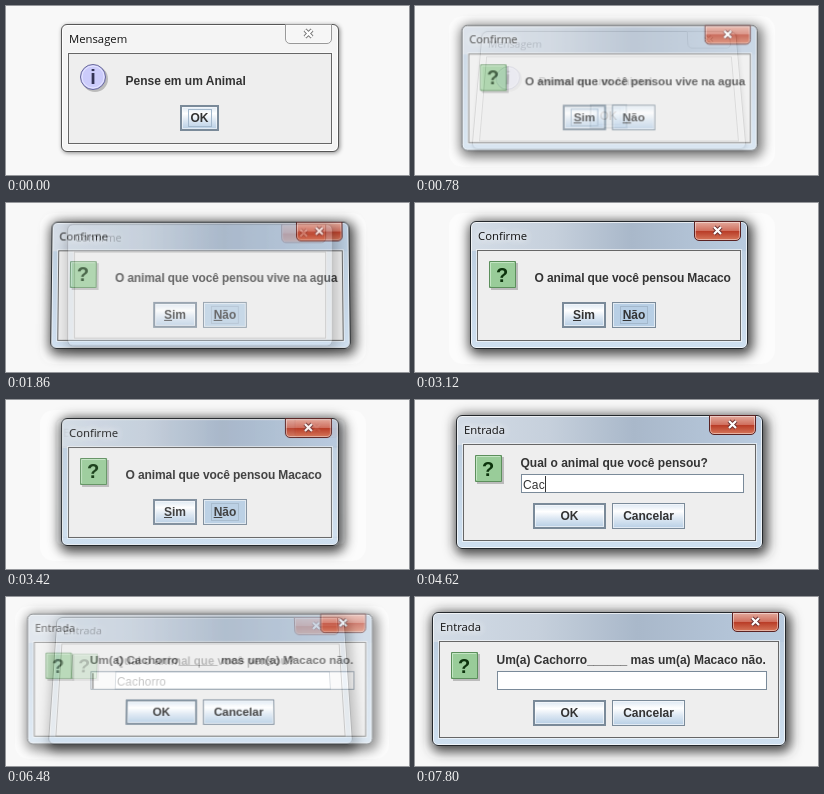
An HTML page that plays this animation: 403 by 169 pixels, repeating every 8000 ms.

```html
<!DOCTYPE html>
<html lang="pt">
<head>
<meta charset="utf-8">
<style>
html, body { margin: 0; width: 100%; height: 100%; overflow: hidden; background: #f8f8f8; }
div, span, svg { box-sizing: border-box; }
#halo, .win, .win > div, .body > * { position: absolute; }
#halo { background: #fcfcfc; border-radius: 14px; }
.win {
  border: 1px solid #24282c; border-radius: 6px;
  background:
    linear-gradient(90deg, #d3dce6, #c6d0dc 30%, #a9b8ca 58%, #b9cbdf) 0 0 / 100% 29px no-repeat,
    linear-gradient(#b9cadc, #cfe0f0);
  box-shadow: inset 0 0 0 1px #ffffffb0, 2px 3px 12px 3px #000000b8;
}
.win.idle { background: #f4f4f4; border-color: #555; box-shadow: inset 0 0 0 1px #fff, 1px 1px 4px #00000070; }
.title {
  left: 7px; top: 5px; color: #111; text-shadow: 0 0 8px #fff, 0 0 8px #fff;
  font: 11.3px/18px "Open Sans", "Noto Sans", sans-serif;
}
.close {
  right: 6px; top: -1px; width: 47px; height: 20px;
  border: 1px solid #5a2222; border-radius: 0 0 5px 5px;
  background: linear-gradient(#e3a99c, #d0705f 48%, #b83a25 50%, #d5765a);
  box-shadow: inset 0 0 0 1px #ffffff70;
}
.idle .close { background: #f6f6f6; border-color: #999; }
.close svg { position: absolute; left: 16px; top: 3px; }
.client {
  left: 6px; right: 6px; top: 28px; bottom: 7px;
  border: 1px solid #666; background: #eee; box-shadow: 0 0 0 1px #ffffff90;
}
.body { left: -1px; top: -1px; font: bold 12px/16px "Liberation Sans", Arial, sans-serif; color: #333; white-space: pre; }
.tight { letter-spacing: -.1px; }
.btn {
  height: 26px; border: 1px solid #7a8a99; text-align: center; line-height: 24px;
  background: linear-gradient(#dde8f3, #fff 30%, #dde8f3 60%, #b8cfe5); box-shadow: inset 0 0 0 1px #ffffff90;
}
.btn.main { border-width: 2px; line-height: 22px; }
.btn.down { background: #b8cfe5; }
.btn span { padding: 1px 2px; border: 1px solid transparent; }
.btn.focus span { border-color: #a3b8cc; }
.input {
  height: 19px; padding: 1px; border: 1px solid #7a8a99; background: #fff;
  font-weight: normal; letter-spacing: .2px; line-height: 18px;
}
.caret { display: inline-block; width: 1px; height: 16px; background: #333; vertical-align: top; }
</style>
</head>
<body>
<div id="halo"></div>
<script>
const LOOP = 8000, STEP = 60, FADE = 360;

const px = (x, y, w) => `left:${x}px;top:${y}px;${w ? `width:${w}px` : ''}`;
const button = (x, y, w, label, cls = '') =>
  `<div class="btn ${cls}" style="${px(x, y, w)}"><span>${label}</span></div>`;
const text = (y, s, cls = '') => `<div class="${cls}" style="${px(64.5, y)}">${s}</div>`;
const input = w =>
  `<div class="input" style="${px(65, 59, w)}"><span class="typed"></span><i class="caret"></i></div>`;

const glyph = (s, y, size, fill) =>
  `<text x="14" y="${y}" text-anchor="middle" font-size="${size}" font-weight="bold" fill="${fill}">${s}</text>`;
const icon = shape => `<svg width="32" height="32" style="${px(18, 39)}">${shape}</svg>`;
const info = icon(`<circle cx="16" cy="16" r="13" fill="#bbb"/>
  <circle cx="14" cy="14" r="12.5" fill="#ccccfb" stroke="#666699"/>
  <circle cx="14" cy="14" r="11" fill="none" stroke="#e6e6ff"/>${glyph('i', 21, 20, '#333355')}`);
const question = icon(`<path d="M3 3h27v27H3z" fill="#bbb"/>
  <path d="M1.5 1.5h26v26h-26z" fill="#99cc99" stroke="#5c8f5c"/>
  <path d="M26 2.5H2.5V26" fill="none" stroke="#c4e6c4"/>${glyph('?', 21.5, 20, '#0c330c')}`);

const cross = idle => `<svg width="14" height="12" fill="none">
  <path d="M3 2l7 7M10 2l-7 7" stroke="${idle ? '#777' : '#6b3030'}" stroke-width="4"/>
  <path d="M3 2l7 7M10 2l-7 7" stroke="#fff" stroke-width="2.2"/></svg>`;

function dialog(x, y, w, h, title, body, idle) {
  const el = document.createElement('div');
  el.className = idle ? 'win idle' : 'win';
  el.style.cssText = px(x, y, w) + `;height:${h}px`;
  el.innerHTML = `<div class="title">${title}</div><div class="close">${cross(idle)}</div>
    <div class="client"></div><div class="body">${body}</div>`;
  document.body.append(el);
  return el;
}

const yesNo = x => button(x, 81, 44, '<u>S</u>im', 'main') + button(x + 50, 81, 44, '<u>N</u>ão');
const okCancel = x => button(x, 88, 73, 'OK', 'main') + button(x + 79, 88, 73, 'Cancelar');

const wins = [
  dialog(55, 18, 278, 128, 'Mensagem',
    info + text(49, 'Pense em um Animal') + button(119, 81, 39, 'OK', 'main focus'), true),
  dialog(44, 18, 301, 128, 'Confirme',
    question + text(49, 'O animal que você pensou vive na agua', 'tight') + yesNo(103)),
  dialog(55, 18, 278, 128, 'Confirme',
    question + text(49, 'O animal que você pensou Macaco', 'tight') + yesNo(92)),
  dialog(41, 15, 307, 134, 'Entrada',
    question + text(40, 'Qual o animal que você pensou?') + input(223) + okCancel(77)),
  dialog(17, 15, 354, 134, 'Entrada',
    question + text(40, 'Um(a) Cachorro______ mas um(a) Macaco não.') + input(270) + okCancel(101)),
];
const opens = [-FADE, 540, 1740, 3360, 6270, Infinity];
const keys = [4320, 4500, 4620, 4800, 4980, 5100, 5280, 5340];

const progress = u => {
  const k = Math.min(1, Math.max(0, u / FADE));
  return k * k * (3 - 2 * k);
};
const within = (t, a, b) => t >= a && t < b;
const halo = document.getElementById('halo');
const find = (i, sel) => wins[i].querySelector(sel);

function chooseNo(i, on) {
  const [yes, no] = wins[i].querySelectorAll('.btn');
  yes.classList.toggle('focus', !on);
  no.classList.toggle('focus', on);
  no.classList.toggle('down', on);
}

function draw(t) {
  wins.forEach((el, i) => {
    const a = progress(t - opens[i]), b = progress(t - opens[i + 1]);
    const scale = (.94 + .06 * a) * (1 - .09 * b * b);
    el.style.visibility = a > 0 && b < 1 ? 'visible' : 'hidden';
    el.style.opacity = a * (1 - b ** 3);
    el.style.transform = a < 1 || b > 0
      ? `perspective(400px) scale(${scale}) rotateX(${26 * b * b}deg)` : 'none';
    // Contents are painted only after the frame has begun to appear.
    find(i, '.body').style.opacity = a < .5 ? 0 : 1;
  });

  find(0, '.btn').classList.toggle('down', t >= 540);
  chooseNo(1, t >= 1140);
  chooseNo(2, t >= 3120);

  find(3, '.typed').textContent = 'Cachorro'.slice(0, keys.filter(k => t >= k).length);
  find(3, '.caret').style.opacity = +(t < 4200 || within(t, 4320, 5820));
  find(4, '.caret').style.opacity = +(t < 6840 || within(t, 7320, 7800));

  halo.style.cssText = t < 540 ? 'display:none'
    : t < 6240 ? px(34, 10, 326) + ';height:151px' : px(9, 9, 374) + ';height:153px';
}

const start = performance.now();
function tick() {
  const t = (performance.now() - start) % LOOP;
  draw(Math.floor(t / STEP + .01) * STEP);
  requestAnimationFrame(tick);
}
tick();
</script>
</body>
</html>
```
